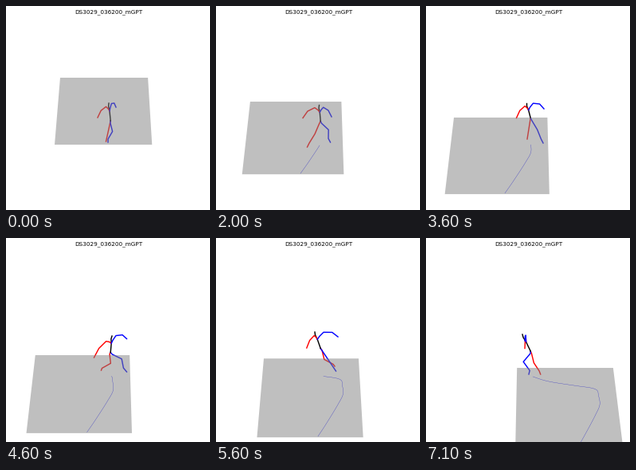
A matplotlib script for the animation above (7.2 s loop, 256 by 256 pixels).

```python
import numpy as np
import matplotlib.pyplot as plt
from matplotlib.animation import FuncAnimation
from matplotlib.patches import Polygon

SIZE, DPI = 256, 100
FRAMES, INTERVAL = 72, 100

# Ground perspective: vanishing point, screen y under the walker, plane size
VX, VY, FOOT_Y = 131.2, -673, 173
PLANE_W, PLANE_D = 122.1, 0.11

# Walk path: time, left edge and far depth of the plane seen from the walker
PATH = np.array([
    (0, -70.1, 1.1088), (10, -79.6, 1.0930), (20, -94.2, 1.0668),
    (28, -100.5, 1.0530), (36, -100.1, 1.0406), (46, -97.4, 1.0317),
    (50, -92.0, 1.0296), (56, -73.1, 1.0264), (64, -37.9, 1.0197),
    (71, -17.2, 1.0120),
])


def pose(time, root_y, head, hands, feet, bends):
    """Key pose; hands, feet and knee bends are given right, then left."""
    return [time, root_y, *head, *np.ravel(hands), *np.ravel(feet), *bends]


POSES = np.array([
    pose(0, 144, (129, 122), [(115, 140), (138, 127)],
         [(125.5, 170), (128, 171)], (0, 4)),
    pose(10, 145, (130, 121.5), [(142.5, 137), (110.5, 130)],
         [(117, 177), (112.5, 171)], (3, -5)),
    pose(20, 144.5, (129.5, 124.5), [(109, 140.5), (145, 139)],
         [(114.5, 177), (143.5, 171)], (1, 4.5)),
    pose(36, 140.5, (126.5, 122.5), [(113.5, 140.5), (148, 129)],
         [(127, 167), (147, 172)], (0, 1)),
    pose(46, 143.5, (133, 123), [(110.5, 150), (151.5, 126.5)],
         [(119.5, 166), (151.5, 168)], (6.5, 5.5)),
    pose(56, 138.5, (124, 118), [(113.8, 138), (153, 124)],
         [(149, 161), (150.5, 167)], (-5, 0)),
    pose(71, 142, (121, 121), [(124, 138.5), (124, 129)],
         [(143.7, 171), (129, 171)], (-2, -8)),
])


def smooth(keys, at):
    """Cubic Hermite curve through rows of (time, values...)."""
    times, values = keys[:, 0], keys[:, 1:]
    slopes = np.gradient(values, times, axis=0)
    i = np.clip(np.searchsorted(times, at, side="right") - 1, 0, len(times) - 2)
    span = (times[i + 1] - times[i])[:, None]
    p = (at - times[i])[:, None] / span
    return ((1 + 2 * p) * (1 - p) ** 2 * values[i]
            + p * (1 - p) ** 2 * span * slopes[i]
            + p * p * (3 - 2 * p) * values[i + 1]
            + p * p * (p - 1) * span * slopes[i + 1])


def project(x, depth):
    """Ground position to screen; depth 1 is under the walker."""
    return np.column_stack([VX + x / depth, VY + (FOOT_Y - VY) / depth])


def spine(root, head):
    reach = head - root
    return [root, root + 0.55 * reach, root + 0.82 * reach - (0.8, 0), head]


def arm(chest, hand):
    """Collar, shoulder and elbow arch above the line to the hand."""
    reach = hand - chest
    return [chest, chest + 0.1 * reach - (0, 3.5),
            chest + 0.3 * reach - (0, 8), chest + 0.72 * reach - (0, 6.5), hand]


def leg(root, foot, bend):
    """The knee leaves the line to the foot sideways by the bend."""
    reach = foot - root
    side = np.array([reach[1], -reach[0]]) / np.hypot(*reach)
    knee = root + 0.48 * reach + bend * side
    ankle = knee + 0.7 * (foot - knee) - (0.4 * bend, 0)
    return [root, root + 0.1 * reach, knee, ankle, foot]


def skeleton(values):
    root = np.array([VX, values[0]])
    head, r_hand, l_hand, r_foot, l_foot = values[1:11].reshape(5, 2)
    r_bend, l_bend = values[11:]
    back = spine(root, head)
    return [leg(root, r_foot, r_bend), leg(root, l_foot, l_bend), back,
            arm(back[1], r_hand), arm(back[1], l_hand)]


clock = np.arange(FRAMES)
ground = smooth(PATH, clock)
motion = smooth(POSES, clock)

fig = plt.figure(figsize=(SIZE / DPI, SIZE / DPI), dpi=DPI, facecolor="white")
ax = fig.add_axes([0, 0, 1, 1])
ax.set_xlim(0, SIZE)
ax.set_ylim(SIZE, 0)
ax.axis("off")
fig.text(0.502, 0.983, "DS3029_036200_mGPT", fontsize=5.2,
         family="DejaVu Sans", ha="center", va="top")

trail, = ax.plot([], [], color="blue", lw=0.256, zorder=1)
bones = [ax.plot([], [], color=color, lw=1.024, zorder=2)[0]
         for color in ("red", "blue", "black", "red", "blue")]
# The translucent floor covers the figure and mutes its colours
floor = Polygon(np.zeros((4, 2)), facecolor=(0.5, 0.5, 0.5, 0.5),
                edgecolor="none", zorder=5)
ax.add_patch(floor)


def draw(frame):
    left, far = ground[frame]
    right, near = left + PLANE_W, far - PLANE_D
    floor.set_xy(project(np.array([left, right, right, left]),
                         np.array([far, far, near, near])))
    past = ground[:frame]
    trail.set_data(*project(left - past[:, 0], 1 + far - past[:, 1]).T)
    for bone, chain in zip(bones, skeleton(motion[frame])):
        bone.set_data(*np.transpose(chain))
    return [trail, *bones, floor]


anim = FuncAnimation(fig, draw, frames=FRAMES, interval=INTERVAL,
                     repeat=True, repeat_delay=0, blit=False)
plt.show()
```
